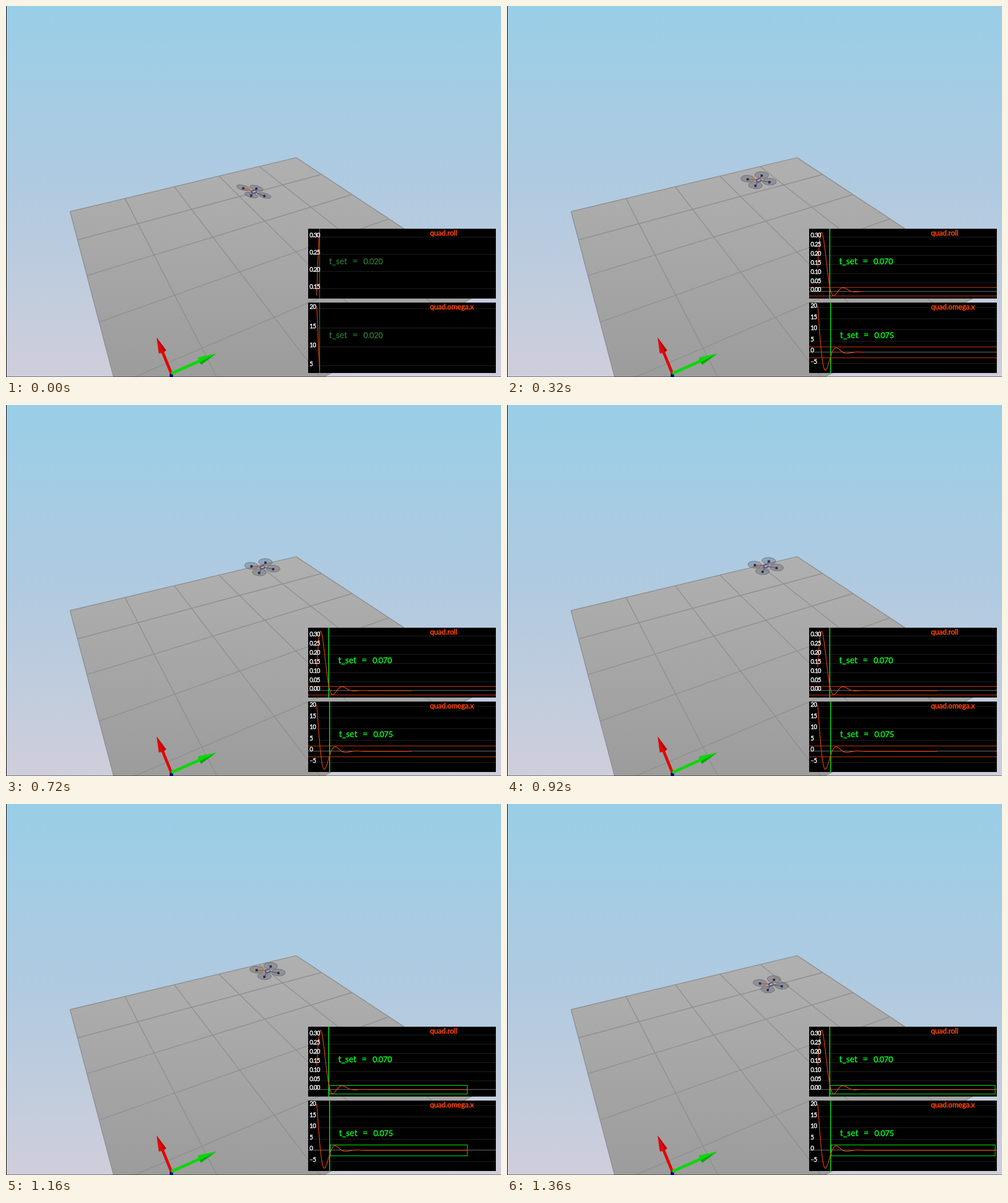
These frames come from a looping animation (865 by 648 pixels, 1.4 s). An HTML page with a canvas:

```html
<!DOCTYPE html>
<html lang="en">
<head>
<meta charset="utf-8">
<title>Quadrotor settling time</title>
<style>
html, body { margin: 0; width: 100%; height: 100%; overflow: hidden; background: #000; }
canvas { display: block; }
</style>
</head>
<body>
<canvas id="stage" width="865" height="648"></canvas>
<script>
const ctx = document.getElementById('stage').getContext('2d');
const { sin, cos, exp, PI } = Math;
const LOOP = 1400, STEP = 40;
const FONT = 'Lato, "Open Sans", sans-serif';
const ORANGE = '#ff4500', GREEN = '#00ff20', DIM_GREEN = '#2a722f';

// Plot geometry: x of the first sample, x of simulated time zero, pixels per second.
const LEFT = 528, WIDTH = 328, START = 543, ZERO = 541.6, RATE = 320;
const penX = t => 548 + .2243 * t + 2.5 * sin(2 * PI * t / 1360);

// Both signals are damped oscillations; roll also has a slow decaying part.
const DAMPING = .074, FREQ = .1676;
const omega = d => 23.5 * exp(-DAMPING * d) * cos(FREQ * d + .49);
const roll = d => .2 * exp(-.07 * d) + exp(-DAMPING * d) * (.4 * sin(FREQ * d) - .07 * cos(FREQ * d));

const plots = [
  { title: 'quad.roll', value: roll, top: 389, bottom: 511, band: .025, tick: .05, digits: 2, settle: .07 },
  { title: 'quad.omega.x', value: omega, top: 518, bottom: 641, band: 2.4, tick: 5, digits: 0, settle: .075 }
];

function path(pts, close) {
  ctx.beginPath();
  for (const [x, y] of pts) ctx.lineTo(x, y);
  if (close) ctx.closePath();
}

function line(pts, color, width = 1) {
  path(pts);
  ctx.strokeStyle = color;
  ctx.lineWidth = width;
  ctx.stroke();
}

function fill(pts, color) {
  path(pts, true);
  ctx.fillStyle = color;
  ctx.fill();
}

function gradient(y0, y1, ...colors) {
  const g = ctx.createLinearGradient(0, y0, 0, y1);
  colors.forEach((c, i) => g.addColorStop(i / (colors.length - 1), c));
  return g;
}

function text(str, x, y, size, color, spacing = 0, weight = .4) {
  ctx.font = `${size}px ${FONT}`;
  ctx.letterSpacing = spacing + 'px';
  ctx.fillStyle = ctx.strokeStyle = color;
  ctx.lineWidth = weight;
  ctx.fillText(str, x, y);
  ctx.strokeText(str, x, y);
}

// Perspective view of the floor, u and v from 0 to 1.
function floorPoint(u, v) {
  const w = 1 + .283 * u - .518 * v;
  return [(112 + 538.4 * u + .3 * v) / w, (359 - 19.1 * u + 35.8 * v) / w];
}

// Arrow along the angle: shaft, then a cone with a shaded side.
function arrow(x, y, angle, length, head, color, shade) {
  ctx.save();
  ctx.translate(x, y);
  ctx.rotate(angle);
  const neck = length - head;
  line([[0, 0], [neck, 0]], color, 5);
  fill([[length, 0], [neck, -7], [neck - 2, 0], [neck, 7]], color);
  fill([[length, 0], [neck - 1, 2], [neck, 7]], shade);
  ctx.restore();
}

function drawScene() {
  ctx.fillStyle = gradient(0, 648, '#99cee7', '#b0cae0', '#cfcedb');
  ctx.fillRect(0, 0, 865, 648);

  const corners = [floorPoint(0, 0), floorPoint(1, 0), floorPoint(1, 1), floorPoint(0, 1)];
  fill(corners, gradient(265, 648, '#b0b0b0', '#a6a6a6', '#9c9c9c'));
  for (let i = 0; i <= 5; i++) {
    line([floorPoint(i / 5, 0), floorPoint(i / 5, 1)], '#8e8e8e', 1.4);
    line([floorPoint(0, i / 5), floorPoint(1, i / 5)], '#8e8e8e', 1.4);
  }

  line([[289, 642], [289, 648]], '#00008c', 6);
  arrow(289, 642, -1.96, 68, 27, '#e00808', '#b80606');
  arrow(289, 642, -.418, 86, 32, '#08d808', '#08a808');
}

function drawDrone(t) {
  const s = (t - 870) / 1000;
  const tilt = roll(penX(t) - START) / .32;
  const arms = [[5.5 - tilt, -9 + 3 * tilt], [19 - tilt / 2, 2.5 + 4.3 * tilt]];
  ctx.save();
  ctx.translate(433 + .0207 * t, 281 + s * s * (111 + 62 * s));
  arms.forEach(([ax, ay], i) => {
    for (const side of [1, -1]) {
      const x = ax * side, y = ay * side;
      ctx.beginPath();
      ctx.ellipse(x, y, 12, 6 - 1.8 * tilt, .05 + .22 * tilt, 0, 2 * PI);
      ctx.fillStyle = 'rgba(88,90,96,.34)';
      ctx.fill();
      ctx.strokeStyle = 'rgba(70,70,76,.5)';
      ctx.lineWidth = 1;
      ctx.stroke();
      line([[0, 0], [x, y + 1]], i ? (side < 0 ? '#d8502c' : '#606084') : (side > 0 ? '#c4543c' : '#606084'), 1.6);
      ctx.fillStyle = '#282866';
      ctx.fillRect(x - 2, y - 1, 4, 4);
    }
  });
  fill([[-6, -1], [1, -4], [6, 0], [4, 3], [-3, 4]], '#565872');
  fill([[-3, 0], [2, -2], [4, 0], [-1, 2]], '#a9b2ca');
  ctx.restore();
}

function drawPlot(plot, t) {
  const { top, bottom, value, band, tick } = plot;
  const end = penX(t), samples = [];
  for (let x = START; x < end; x++) samples.push([x, value(x - START)]);
  samples.push([end, value(end - START)]);
  const values = samples.map(s => s[1]);
  const max = Math.max(...values), min = Math.min(...values);
  const scale = (bottom - top - 11) / (max - min);
  const toY = v => top + 6 + (max - v) * scale;
  const hline = (y, color) => line([[LEFT, y], [LEFT + WIDTH, y]], color);

  ctx.save();
  ctx.beginPath();
  ctx.rect(LEFT, top, WIDTH, bottom - top);
  ctx.clip();
  ctx.fillStyle = '#000';
  ctx.fillRect(LEFT, top, WIDTH, bottom - top);

  const first = Math.ceil(min / tick), last = Math.floor(max / tick);
  for (let i = first; i <= last; i++)
    hline(Math.floor(toY(i * tick)) + .5, i ? '#202020' : '#707070');

  const setTime = Math.min((end - ZERO) / RATE, plot.settle);
  const setX = ZERO + RATE * setTime;
  const setColor = t < 200 ? DIM_GREEN : GREEN;
  const bandTop = Math.floor(toY(band)) + .5, bandBottom = Math.floor(toY(-band)) + .5;
  if (t < 1160) {
    hline(bandTop, '#c83a08');
    hline(bandBottom, '#c83a08');
  } else {
    ctx.strokeStyle = '#00d01c';
    ctx.lineWidth = 1.2;
    ctx.strokeRect(setX + 1, bandTop, end - setX - 1, bandBottom - bandTop);
  }
  line([[setX, top], [setX, bottom]], setColor, 1.4);
  line(samples.map(([x, v]) => [x, toY(v)]), '#e8420c', 1.2);

  for (let i = first; i <= last; i++)
    text((i * tick).toFixed(plot.digits).replace('-', '\u2212'), 530.5, toY(i * tick) + .5, 10.5, '#fff', -.7);
  text(plot.title, 741, top + 12, 12.6, ORANGE, 0, .5);
  const label = setX + 16.5, base = top + 62;
  text('t_set', label, base, 14.5, setColor, .2);
  text('=', label + 41, base, 16, setColor);
  text((Math.round(setTime * 200) / 200).toFixed(3), label + 60, base, 14, setColor, -.4);
  ctx.restore();
}

function render(now) {
  const t = Math.floor(now % LOOP / STEP) * STEP;
  drawScene();
  drawDrone(t);
  for (const plot of plots) drawPlot(plot, t);
  ctx.fillStyle = '#000';
  ctx.fillRect(0, 0, 1, 648);
  ctx.fillStyle = 'rgba(0,0,0,.45)';
  ctx.fillRect(0, 647, 865, 1);
}

const begin = performance.now();
function loop() {
  render(performance.now() - begin);
  requestAnimationFrame(loop);
}
loop();
</script>
</body>
</html>
```
